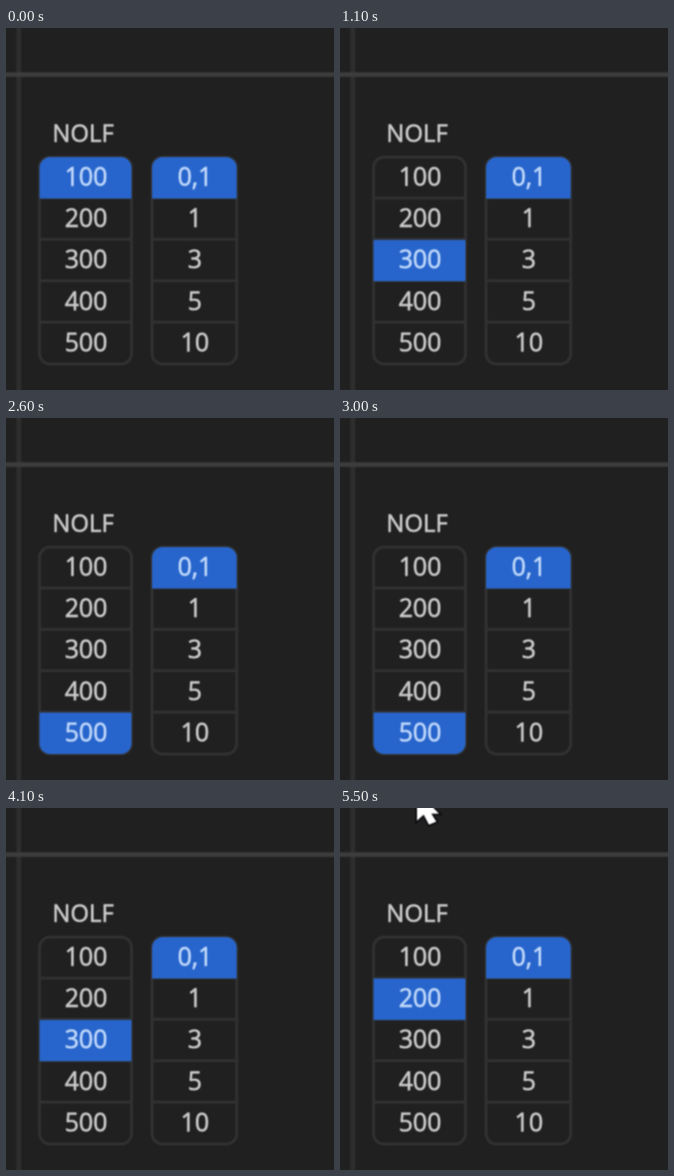
An HTML page that plays this animation: 494x544 px, repeating every 5600 ms.

```html
<!DOCTYPE html>
<html lang="en">
<head>
<meta charset="utf-8">
<title>Amount picker</title>
<style>
  html, body { margin: 0; width: 100%; height: 100%; overflow: hidden; background: #202020; }
  svg { display: block; width: 494px; height: 544px; }
  text {
    font: 500 37.5px "Open Sans", "Noto Sans", sans-serif;
    fill: #cbcbcb; stroke: #cbcbcb; stroke-width: .9; text-anchor: middle;
  }
  text.on { fill: #c0d8fa; stroke: #c0d8fa; }
  text.label { font-size: 36px; font-weight: 400; }
  .soft { filter: blur(1.15px); }
  .line { fill: none; stroke: #313131; stroke-width: 4.5; }
  .pick { fill: #2765cc; }
</style>
</head>
<body>
<svg id="stage" viewBox="0 0 494 544">
  <rect width="494" height="544" fill="#202020"/>
  <g class="soft">
    <rect x="15.500" y="-5" width="7.500" height="554" fill="#2e2e2e"/>
    <rect x="-5" y="66.500" width="504" height="7" fill="#3d3d3d"/>
    <text class="label" x="116" y="171">NOLF</text>
    <g id="lists"></g>
    <path id="cursor" d="M0 0V45L10 36L18 51L29 46.500L21.500 34.500H33Z"
      fill="#fff" stroke="#0c0c12" stroke-width="5" paint-order="stroke"/>
  </g>
</svg>
<script>
const LOOP = 5600, TOP = 194, ROW = 62.2, RADIUS = 16;
const lists = document.getElementById('lists');
const cursor = document.getElementById('cursor');

// [start ms, selected row]
const picks = [[0, 0], [500, 1], [1100, 2], [2000, 3], [2600, 4], [3700, 3], [4100, 2], [4500, 1]];
// [start ms, tip x, tip y]
const tips = [[0, 0, -100], [5400, 123, -37], [5500, 116, -26]];

function add(tag, attrs, label = '') {
  const el = document.createElementNS('http://www.w3.org/2000/svg', tag);
  for (const key in attrs) el.setAttribute(key, attrs[key]);
  el.textContent = label;
  return lists.appendChild(el);
}

// Outline of one row, rounded only at the ends of the list
function rowPath(x, w, row, count) {
  const y = TOP + row * ROW, b = y + ROW, r = x + w;
  const t = row === 0 ? RADIUS : 0, e = row === count - 1 ? RADIUS : 0;
  const arc = (radius, px, py) => `A${radius} ${radius} 0 0 1 ${px} ${py}`;
  return `M${x} ${y + t}${arc(t, x + t, y)}H${r - t}${arc(t, r, y + t)}` +
    `V${b - e}${arc(e, r - e, b)}H${x + e}${arc(e, x, b - e)}Z`;
}

function makeList(x, w, labels) {
  const n = labels.length;
  add('rect', { class: 'line', x, y: TOP, width: w, height: n * ROW, rx: RADIUS });
  for (let i = 1; i < n; i++) {
    const y = TOP + i * ROW - .8;
    add('path', { class: 'line', d: `M${x} ${y}H${x + w}` });
  }
  const pick = add('path', { class: 'pick' });
  const texts = labels.map((label, i) =>
    add('text', { x: x + w / 2 + .8, y: TOP + i * ROW + 43 }, label));
  return row => {
    pick.setAttribute('d', rowPath(x, w, row, n));
    texts.forEach((t, i) => t.classList.toggle('on', i === row));
  };
}

const selectAmount = makeList(50.5, 138.5, ['100', '200', '300', '400', '500']);
const selectStep = makeList(220, 127.5, ['0,1', '1', '3', '5', '10']);
selectStep(0);

const stepAt = (steps, t) => steps.filter(s => s[0] <= t).pop();

function draw() {
  const t = performance.now() % LOOP;
  selectAmount(stepAt(picks, t)[1]);
  const [, x, y] = stepAt(tips, t);
  cursor.setAttribute('transform', `translate(${x} ${y})`);
  requestAnimationFrame(draw);
}
draw();
</script>
</body>
</html>
```
